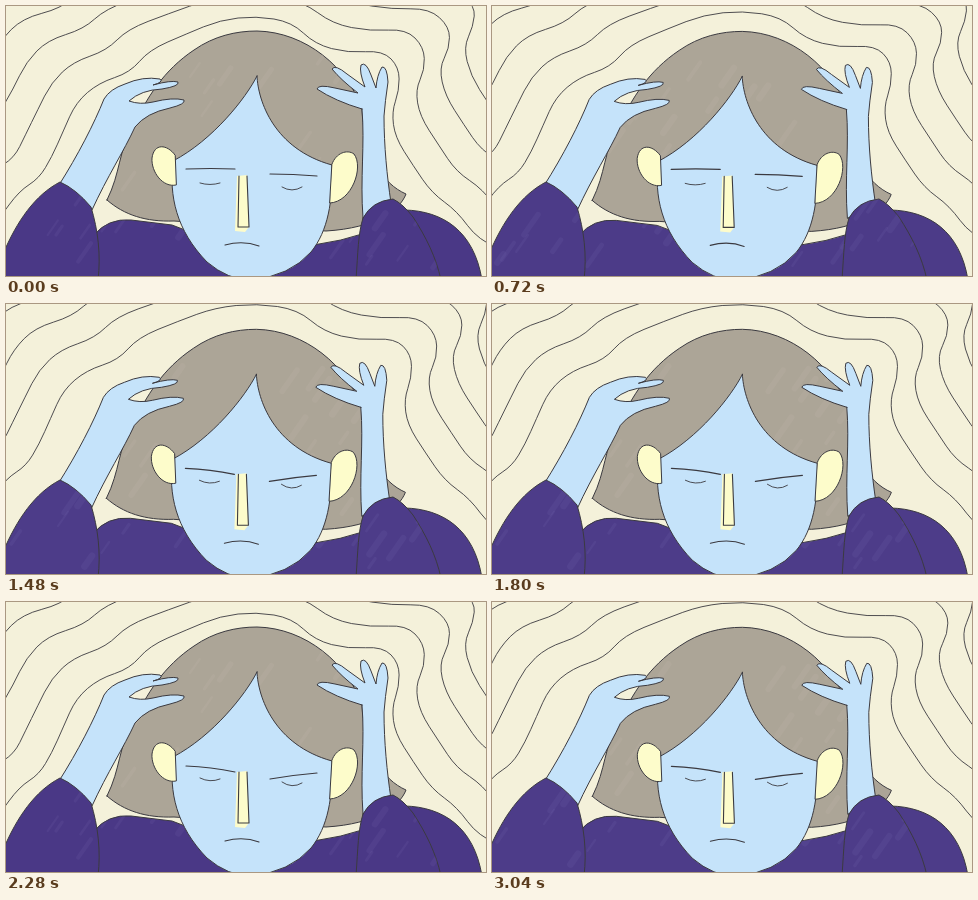
Recreate the animation shown at these times as an HTML page with a canvas. Size 480x270 px, loop 3.08 s.

```html
<!DOCTYPE html>
<html lang="en">
<head>
<meta charset="utf-8">
<style>
html, body { margin: 0; width: 100%; height: 100%; overflow: hidden; background: #f4f1da; }
canvas { display: block; width: 100vw; height: 100vh; }
</style>
</head>
<body>
<canvas id="stage" width="480" height="270"></canvas>
<script>
const ctx = document.getElementById('stage').getContext('2d');
const LOOP = 3080, POSE_MS = 80, POSES = 4;
const PAPER = '#f4f1da', INK = '#3b3a40', SKIN = '#c5e3fa', HAIR = '#aca597', CREAM = '#fdfccb';
const SWEATER = ['#4a3886', '#4c3b88', '#4d3c89', '#4b3987'];

const shape = {
  hair: 'M101 194C115 166 112 145 127 122C140 92 158 64 188 44C208 30 230 25 251 25C300 26 342 62 356 103C358 150 377 178 400 188C394 204 370 222 320 225L168 215C140 216 118 209 101 194Z',
  chest: 'M88 229Q102 212 125 214L166 219Q240 250 313 238Q335 235 356 228L354 274H88Z',
  face: 'M251 70C240 92 207 134 167 155C163 190 170 224 201 256Q222 274 245 274Q284 270 305 246C322 225 327 195 326 159C268 143 252 95 251 70Z',
  earL: 'M169 149C161 138 148 137 146 152C145 166 157 182 170 179Z',
  earR: 'M326 158C330 147 341 143 348 148C358 161 346 196 324 197Z',
  armL: 'M53 179C72 149 88 118 98 93Q104 83 119 78Q137 70 154 73Q158 76 147 79Q165 74 172 76Q174 80 156 83Q135 84 123 95Q134 99 147 96Q167 91 178 94Q180 98 164 102Q140 107 129 121C118 145 101 171 86 204Z',
  armR: 'M356 103Q329 95 311 83Q312 78 329 82L352 87Q335 74 326 63Q329 58 341 68L359 81Q353 66 355 59Q360 55 365 69L370 82Q371 69 376 61Q381 60 382 76Q379 96 378 110C378 140 381 170 385 197L357 212C354 172 359 139 356 103Z',
  sleeveL: 'M-3 248C11 215 29 189 54 176Q70 183 85 201C92 224 95 249 92 274H-3Z',
  backSleeve: 'M399 204C437 205 468 225 476 274H420Z',
  sleeveR: 'M357 212Q366 195 387 193Q397 198 407 211C420 231 430 251 435 274H350C352 246 352 228 357 212Z'
};
for (const name in shape) shape[name] = new Path2D(shape[name]);

// Innermost ripple, from lower left over the head to lower right
const ripple = [[-25, 235], [-8, 213], [14, 186], [33, 172], [45, 150], [58, 126], [70, 97], [92, 76],
  [125, 66], [143, 45], [180, 28], [215, 13], [250, 10], [285, 17], [310, 38], [342, 46], [376, 45],
  [394, 62], [393, 84], [385, 105], [390, 132], [407, 160], [425, 186], [452, 205], [472, 235], [510, 250]];

function ink(path, width = 1) {
  ctx.strokeStyle = INK;
  ctx.lineWidth = width;
  ctx.stroke(typeof path === 'string' ? new Path2D(path) : path);
}

function fill(name, color) {
  ctx.fillStyle = color;
  ctx.fill(shape[name]);
  ink(shape[name]);
}

function smooth(points) {
  const path = new Path2D();
  path.moveTo(...points[0]);
  for (let i = 1; i < points.length - 1; i++) {
    const [x, y] = points[i], [nx, ny] = points[i + 1];
    path.quadraticCurveTo(x, y, (x + nx) / 2, (y + ny) / 2);
  }
  return path;
}

// Ripples spread upward and away from the middle, one spacing per cycle
function drawRipples(pose) {
  for (let ring = 0; ring < 10; ring++) {
    const step = ring + pose / POSES;
    ink(smooth(ripple.map(([x, y], i) => [
      x + step * 26 * Math.tanh((x - 245) / 80) + Math.sin(i * 2.1 + ring),
      y - step * 21 + Math.cos(i * 1.7 + ring)
    ])), 0.9);
  }
}

// Dry brush marks that change with each drawing
function brush(name, color, pose, [x, y, w, h], count) {
  let seed = pose * 97 + count * 31 + x;
  const rand = () => (seed = (seed * 16807 + 11) % 2147483647) / 2147483647;
  ctx.save();
  ctx.clip(shape[name]);
  ctx.strokeStyle = color;
  for (let i = 0; i < count; i++) {
    const px = x + rand() * w, py = y + rand() * h, len = 8 + rand() * 14;
    ctx.lineWidth = 2 + rand() * 5;
    ctx.beginPath();
    ctx.moveTo(px, py);
    ctx.lineTo(px + len * 0.7, py - len);
    ctx.stroke();
  }
  ctx.restore();
}

function drawFeatures(frown) {
  ctx.fillStyle = CREAM;
  ctx.fill(new Path2D('M231 170L241 169L243 221L239 226L229 225Z'));
  ink('M233 170L232 221L243 221L241 170', 1.1);
  ink(`M180 ${163 + frown}Q205 ${162 + 3 * frown} 229 ${163 + 7 * frown}`, 1.2);
  ink(`M264 ${168 + 9 * frown}Q287 ${168 + 5 * frown} 311 ${170 + frown}`, 1.2);
  ink(`M194 ${177 - frown}Q204 ${180 + frown} 214 177`, 0.9);
  ink(`M276 ${181 - frown}Q286 187 296 181`, 0.9);
  ink('M219 239Q237 234 253 240', 1.1);
}

function draw(time) {
  const pose = Math.floor(time / POSE_MS) % POSES;
  const sweater = SWEATER[pose];
  const drift = [0, -0.8, -0.6, 0.3][pose];
  const t = Math.min(1, Math.max(0, (time - 700) / 750));
  const frown = t * t * (3 - 2 * t);

  ctx.fillStyle = PAPER;
  ctx.fillRect(0, 0, 480, 270);
  ctx.lineCap = ctx.lineJoin = 'round';
  drawRipples(pose);

  ctx.save();
  ctx.translate(drift, -drift / 2);
  fill('hair', HAIR);
  brush('hair', 'rgba(184,177,164,.3)', pose, [115, 50, 235, 160], 22);
  fill('chest', sweater);
  brush('chest', 'rgba(118,104,178,.14)', pose, [95, 220, 260, 45], 8);
  fill('face', SKIN);
  fill('earL', CREAM);
  fill('earR', CREAM);
  drawFeatures(frown);
  fill('armL', SKIN);
  ctx.translate(drift, 0);
  fill('armR', SKIN);
  ctx.restore();

  fill('sleeveL', sweater);
  brush('sleeveL', 'rgba(118,104,178,.14)', pose, [5, 195, 80, 70], 6);
  fill('backSleeve', sweater);
  fill('sleeveR', sweater);
  brush('sleeveR', 'rgba(118,104,178,.14)', pose, [360, 205, 70, 65], 6);
}

const start = performance.now();
function tick() {
  draw((performance.now() - start) % LOOP);
  requestAnimationFrame(tick);
}
tick();
</script>
</body>
</html>
```
